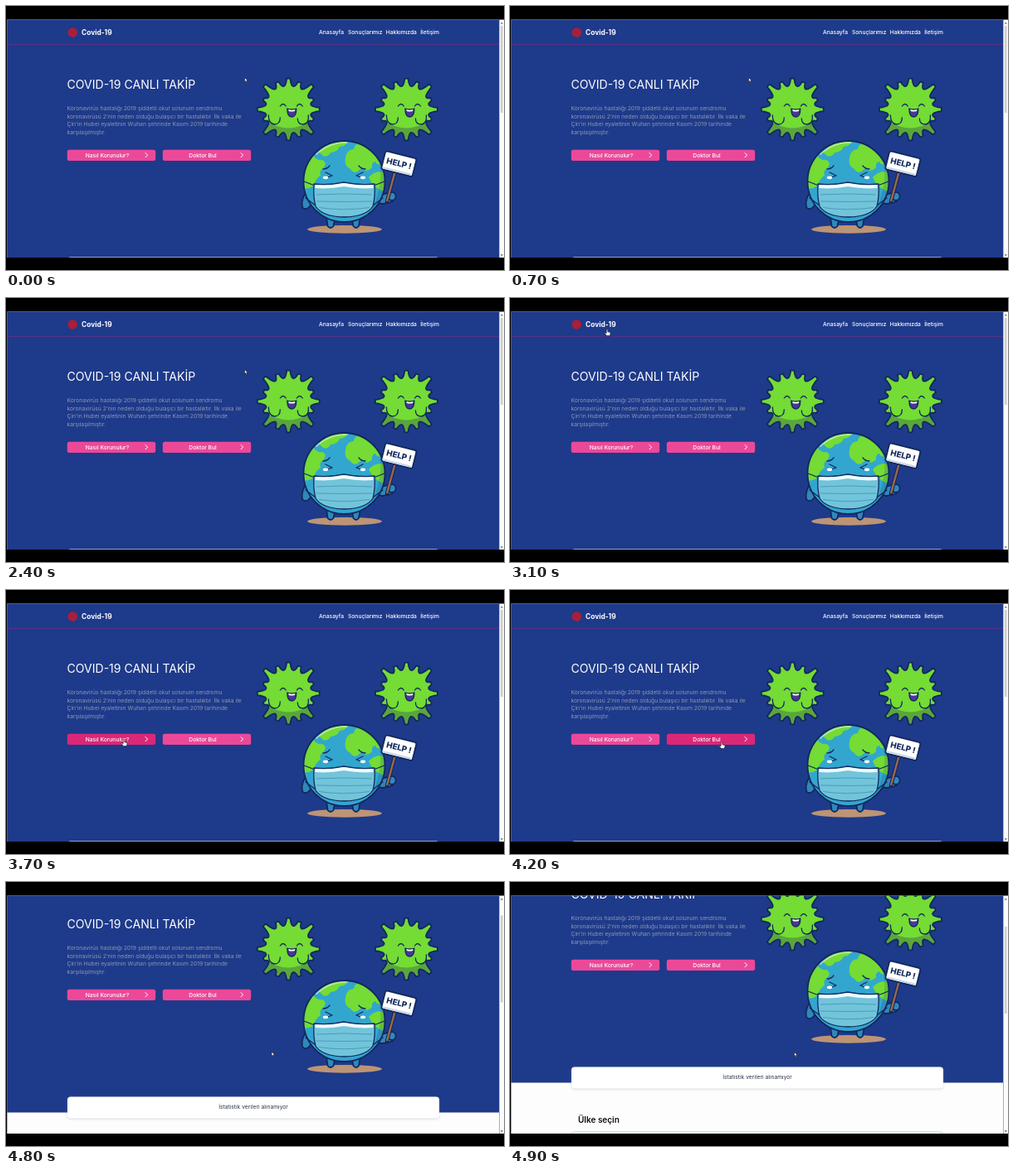
Animation of 600x319 px, one loop 5000 ms. Source, as an HTML page:

```html
<!DOCTYPE html>
<html lang="tr">
<head>
<meta charset="utf-8">
<title>Covid-19</title>
<style>
  html, body { margin: 0; width: 100%; height: 100%; overflow: hidden; background: #000; }
  svg { display: block; width: 100vw; height: 100vh; }
  svg { font-family: Inter, "Open Sans", sans-serif; fill: #fff; }
  .nav { font-size: 6.7px; font-weight: 500; }
  .para { font-size: 6.75px; fill: #8f98b2; }
  .btn { font-size: 6.7px; font-weight: 500; text-anchor: middle; }
  .ink { stroke: #12285c; stroke-width: 1.8; stroke-linejoin: round; stroke-linecap: round; }
  .thin { stroke-width: 1.3; }
  .line { fill: none; }
  .card { filter: drop-shadow(0 1.5px 1.5px #94a3b866); }
</style>
</head>
<body>
<svg viewBox="0 0 600 319">
  <defs>
    <clipPath id="view"><rect x="1.3" y="16.6" width="598.7" height="287.4"/></clipPath>
    <clipPath id="globe"><circle cx="407.5" cy="212" r="48.5"/></clipPath>
    <clipPath id="spiky"><path id="spikyClip"/></clipPath>
    <g id="virus">
      <path id="spikyBody" fill="#74dc34"/>
      <path clip-path="url(#spiky)" fill="#5aa63c" d="M-42 15 L-26 14 Q0 31 26 14 L42 15 V42 H-42 Z"/>
      <path id="spikyEdge" class="ink line"/>
      <path class="ink thin line" d="M-24 7 Q-24 17 -17 18 Q-10 18 -10 10 M24 7 Q25 17 18 18 Q11 18 11 11"/>
      <path class="ink thin line" d="M-10 -4 q3.5 -5 7 0 M10 -4 q3.5 -5 7 0"/>
      <path class="ink thin" fill="#4b3796" d="M-1.5 -1 Q4 1 9.5 -1 Q9.5 9 4 9 Q-1.5 9 -1.5 -1 Z"/>
      <path d="M0 0 Q4 1.6 8 0 L7.6 2 Q4 3 .4 2 Z"/>
    </g>
  </defs>

  <rect width="600" height="319" fill="#000"/>
  <g clip-path="url(#view)">
    <rect width="594" height="304" fill="#fdfdfd"/>
    <g id="page">
      <rect width="594.3" height="322.5" fill="#1e3a8a"/>
      <path d="M0 46.4 H594.3" stroke="#5f2f86" stroke-width="1"/>
      <circle cx="80.3" cy="32" r="5.8" fill="#a91f3a"/>
      <text x="91" y="35" font-size="8.35" font-weight="700">Covid-19</text>
      <g class="nav">
        <text x="377" y="34.4">Anasayfa</text>
        <text x="412" y="34.4">Sonuçlarımız</text>
        <text x="457.8" y="34.4">Hakkımızda</text>
        <text x="499.3" y="34.4">İletişim</text>
      </g>
      <text x="73.5" y="99.8" font-size="14.05">COVID-19 CANLI TAKİP</text>
      <g class="para">
        <text x="73.5" y="126.2">Koronavirüs hastalığı 2019 şiddetli okut solunum sendromu</text>
        <text x="73.5" y="135.8">koronavirüsü 2'nin neden olduğu bulaşıcı bir hastalıktır. İlk vaka ile</text>
        <text x="73.5" y="145.4">Çin'in Hubei eyaletinin Wuhan şehrinde Kasım 2019 tarihinde</text>
        <text x="73.5" y="155">karşılaşılmıştır.</text>
      </g>
      <rect id="guard" x="73.8" y="173.7" width="106.4" height="13.4" rx="2.5"/>
      <rect id="doctor" x="188.8" y="173.7" width="106.4" height="13.4" rx="2.5"/>
      <text class="btn" x="122" y="182.6">Nasıl Korunulur?</text>
      <text class="btn" x="237" y="182.6">Doktor Bul</text>
      <path d="M168 177.6 l2.6 2.6 -2.6 2.6 M283 177.6 l2.6 2.6 -2.6 2.6" fill="none" stroke="#fff" stroke-linecap="round" stroke-linejoin="round"/>

      <use href="#virus" x="340.3" y="125"/>
      <use href="#virus" x="482.4" y="125"/>

      <ellipse cx="408" cy="269.8" rx="45" ry="4.9" fill="#bd9475"/>
      <g class="ink" fill="#2f88bd">
        <path d="M386 254 L387.5 266 Q391 270 394.5 266 L397 254 Z"/>
        <path d="M416 254 L418.5 266 Q422 270 425 266 L427 254 Z"/>
        <path d="M364 222 Q355 232 357 243 Q361 248 366 242 Q370 236 371 229 Z"/>
        <path d="M446 224 Q452 230 459 226 L466 236 Q453 242 442 236 Z"/>
      </g>
      <circle cx="407.5" cy="212" r="49" fill="#32a6cf"/>
      <g clip-path="url(#globe)">
        <g fill="#74dc34">
          <path d="M356 206 Q359 187 370 180 Q374 187 381 186 Q388 190 382 196 Q377 199 379 205 Q373 208 371 217 Q364 222 356 220 Z"/>
          <path d="M377 176 Q391 162 411 163 Q411 169 402 170 Q399 177 391 177 Q388 183 382 181 Z"/>
          <path d="M409 183 Q411 173 419 173 Q420 165 430 167 Q447 176 453 191 Q447 193 445 188 Q440 189 441 195 Q435 202 428 196 Q420 205 415 197 Q407 194 409 183 Z"/>
          <path d="M437 207 Q445 198 456 201 L458 225 Q443 221 437 207 Z"/>
        </g>
        <path d="M443 172 Q464 210 432 262 L466 260 V172 Z" fill="#11376b" opacity=".18"/>
        <path d="M374 179 Q390 164 411 165" fill="none" stroke="#d9f3d2" stroke-width="2" stroke-linecap="round" opacity=".6"/>
      </g>
      <circle class="ink line" cx="407.5" cy="212" r="49"/>
      <path class="ink thin line" d="M382 197 Q387 197 390 193 M433 197 Q428 197 425 193 M385 201 L393 205 L385 208 M430 201 L422 205 L430 208"/>
      <ellipse cx="385" cy="207.3" rx="3.2" ry="1.9"/>
      <ellipse cx="430" cy="207.3" rx="3.2" ry="1.9"/>
      <path class="ink thin line" d="M359 212 L372 217 M456 212 L443 217 M361 232 L373 241 M454 232 L442 241"/>
      <path class="ink thin" fill="#72c4da" d="M371 215 Q389 217 407 213 Q426 217 444 215 Q445 231 442 242 Q434 254.5 407.5 255 Q381 254.5 373 242 Q370 231 371 215 Z"/>
      <path d="M372.5 218 Q390 219.5 407 216 Q425 219.5 442.5 218" fill="none" stroke="#eefafd" stroke-width="4"/>
      <path d="M374 228 Q407 226 441 228 M374 236 Q407 237 441 236 M377 243.5 Q407 248 438 243.5" fill="none" stroke="#4a9dbb" stroke-width="1"/>

      <ellipse class="ink" cx="465" cy="230" rx="4.6" ry="5" fill="#2f88bd"/>
      <path d="M459 236 L468.5 201" class="ink" style="stroke-width:4.6"/>
      <path d="M459 236 L468.5 201" stroke="#a0674a" stroke-width="2.4"/>
      <g transform="translate(473.4 190.7) rotate(14)">
        <rect class="ink" x="-19.3" y="-11.3" width="38.6" height="22.6" rx="2.5"/>
        <path d="M-17.5 9 H17.5" stroke="#c9d6e6" stroke-width="2"/>
        <text y="3" font-size="9.7" font-weight="800" text-anchor="middle" fill="#12285c">HELP !</text>
      </g>

      <rect class="card" x="74" y="303.4" width="448" height="26" rx="4"/>
      <text x="298" y="318.3" font-size="6.7" text-anchor="middle" fill="#27324a">İstatistik verileri alınamıyor</text>
      <text x="82" y="370.6" font-size="10" font-weight="600" fill="#111">Ülke seçin</text>
      <rect x="74.5" y="382" width="447" height="20" rx="3" stroke="#a9cfea"/>
    </g>

    <rect x="594.3" y="16" width="5.7" height="288" fill="#fbfbfb"/>
    <rect id="thumb" x="596" y="24" width="2.6" height="105" fill="#cdcdcd"/>
    <path d="M595.8 21.5 l1.5 -2 1.5 2 Z M595.8 300.2 l1.5 2 1.5 -2 Z" fill="#606060"/>

    <g stroke="#111827" stroke-width=".6" stroke-linejoin="round">
      <path id="arrow" d="M0 0 V5.2 L1.2 4.1 L2.1 6 L3 5.6 L2.1 3.8 H3.7 Z"/>
      <path id="hand" d="M-.8 .2 Q0 -.8 .8 .2 V2.8 L3.4 3.4 Q4.2 3.8 4 5 L3.3 7.6 H-.6 L-2.8 4.6 Q-2.6 3.4 -.8 4.6 Z"/>
    </g>
  </g>
</svg>
<script>
const LOOP = 5000, STEP = 100;
const el = id => document.getElementById(id);

// Closed outline of sixteen blunt spikes joined by hollow curves
function spikyPath() {
  const n = 16, turn = 2 * Math.PI / n, tip = .055;
  const at = (r, a) => `${(r * Math.cos(a)).toFixed(2)} ${(r * Math.sin(a)).toFixed(2)}`;
  const reach = i => {
    if (i % 2) return 30 + 6 * Math.abs(Math.sin(i * turn));
    return i % 4 ? 41 : 37.5;
  };
  let d = `M${at(reach(0), -tip)} `;
  for (let i = 0; i < n; i++) {
    const a = i * turn;
    d += `L${at(reach(i), a + tip)} Q${at(21, a + turn / 2)} ${at(reach(i + 1), a + turn - tip)} `;
  }
  return d + "Z";
}
for (const id of ["spikyClip", "spikyBody", "spikyEdge"]) el(id).setAttribute("d", spikyPath());

// Keys are [time, ...values]
const pointer = [
  [0, 287.5, 86.5], [2500, 287.5, 86.5], [3000, 117, 38], [3300, 117, 38],
  [3700, 142, 181], [3900, 150, 182], [4200, 255, 184], [4400, 255, 184],
  [4700, 297.5, 204.5], [4900, 342.5, 205.5]
];
const scroll = [[0, 0], [4600, 0], [4700, .7], [4800, 44], [4900, 80]];

function sample(keys, t) {
  const i = keys.findIndex(k => k[0] > t);
  if (i < 0) return keys[keys.length - 1].slice(1);
  const a = keys[i - 1], b = keys[i];
  const u = (t - a[0]) / (b[0] - a[0]);
  const e = u * u * (3 - 2 * u);
  return a.slice(1).map((v, j) => v + (b[j + 1] - v) * e);
}

function draw(t) {
  const [x, y] = sample(pointer, t);
  const [top] = sample(scroll, t);
  const over = (l, w, y0, y1) => x > l && x < l + w && y + top > y0 && y + top < y1;
  const guard = over(74, 106, 173.5, 187), doctor = over(189, 106, 173.5, 187);
  const link = guard || doctor || over(74, 54, 26, 40);

  el("page").setAttribute("transform", `translate(0 ${-top})`);
  el("thumb").setAttribute("y", 24 + top * 30 / 80);
  el("guard").setAttribute("fill", guard ? "#db2777" : "#ec4899");
  el("doctor").setAttribute("fill", doctor ? "#db2777" : "#ec4899");
  for (const id of ["arrow", "hand"]) {
    el(id).setAttribute("transform", `translate(${x} ${y})`);
    el(id).setAttribute("visibility", (id === "hand") === link ? "visible" : "hidden");
  }
}

const start = performance.now();
function tick() {
  const t = (performance.now() - start) % LOOP;
  draw(Math.floor(t / STEP) * STEP);
  requestAnimationFrame(tick);
}
tick();
</script>
</body>
</html>
```
